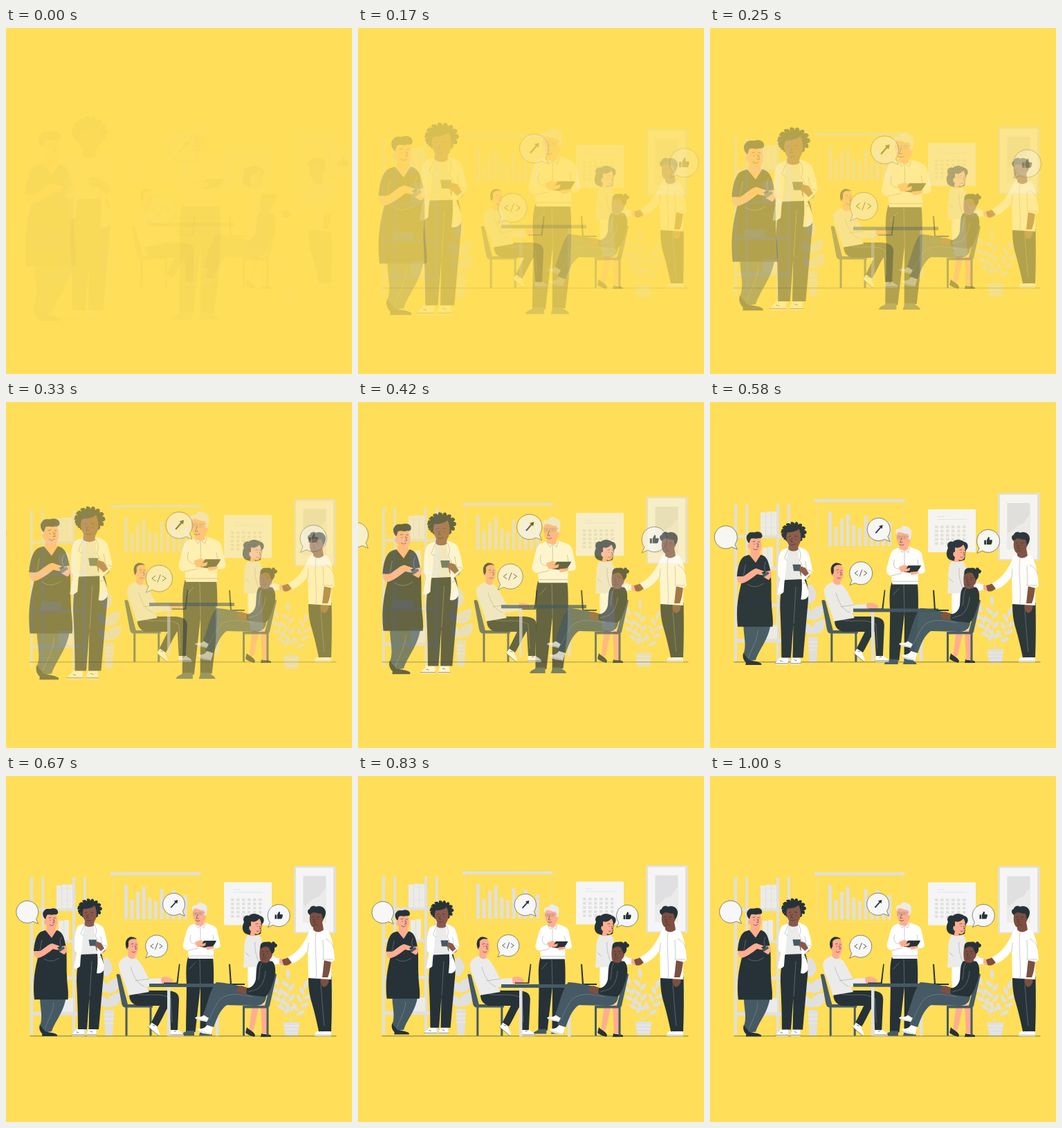
An HTML page that plays this animation: 500 by 500 pixels, repeating every 1.04 s.

```html
<!DOCTYPE html>
<html lang="en">
<head>
<meta charset="utf-8">
<title>Team at work</title>
<style>
html, body { margin: 0; width: 100%; height: 100%; overflow: hidden; background: #ffde59; }
svg { display: block; width: 100vw; height: 100vh; }
.k { fill: #263238; }
.g { fill: #455a64; }
.w { fill: #fff; }
.p { fill: #f5f5f5; }
.l { fill: #e0e0e0; }
.e { fill: #ebebeb; }
.s { fill: #ffad90; }
.b { fill: #8a594b; }
.d { fill: #7d4f40; }
.t, .u, .v { fill: none; stroke: #263238; stroke-width: .6; stroke-linecap: round; stroke-linejoin: round; }
.u { stroke: #8d969a; stroke-width: .5; }
.v { stroke: #e0e0e0; stroke-width: .8; }
.bubble { fill: #f7f7f7; stroke: #263238; stroke-width: .55; }
</style>
</head>
<body>
<svg viewBox="0 0 500 500">
<defs>
  <path id="leaf" d="M0 0C-8-4-7-13 0-19C7-13 8-4 0 0"/>
  <path id="thin" d="M0 0C-4-4-3.500-10 0-15C3.500-10 4-4 0 0"/>
</defs>

<g id="back" class="fade">
  <g id="shelf" class="l">
    <path d="M35 146h4v228h-4zM51.500 146h3.500v228h-3.500zM96 146h4v228h-4zM112 146h3.500v228h-3.500zM35 191h80v4h-80zM35 237h80v4h-80zM35 290h80v4h-80zM35 341h80v5h-80z"/>
    <path class="e" d="M73 158h7v33h-7zM81 157h7v34h-7zM89 157h7v34h-7zM76 209h7v28h-7zM84 208h7v29h-7zM50 279h30v11h-30zM76 321h21v20h-21z"/>
    <path class="v" d="M80.500 158v33M88.500 157v34M75 163h3M83 162h3M91 162h3M75 180h3M83 180h3M91 180h3M83.500 209v28M50 283h30M50 287h30"/>
  </g>
  <g id="chart">
    <path class="v" style="stroke-width:.5" d="M154.500 143V210M278.500 143V210"/>
    <path class="v" style="stroke-width:.5" stroke-dasharray="2 2" d="M154 211H278"/>
    <rect class="l" x="151" y="139" width="130.500" height="4" rx=".5"/>
  </g>
  <g id="calendar">
    <path class="p" d="M315 153.500h69v62h-69z"/>
    <path class="v" d="M329 168H371M329 164h10"/>
  </g>
  <path class="l" d="M416.500 130h60v97.500h-60z"/>
  <path class="p" d="M419 132.500h54v93h-54z"/>
  <path class="l" d="M429.500 144.500h33v67h-33z"/>
  <path class="e" d="M429.500 188C440 186 439 178 448 176C457 174 455 165 462.500 162V211.500H429.500z"/>
  <g id="plants" class="l"></g>
  <path class="l" d="M141.500 338h14.500l-2 37h-10.500zM400.500 356h24l-3 19.500h-18z"/>
  <path class="t" style="stroke:#f5f5f5" d="M142 345h13M142 351h13M143 357h11M402 361h21M402 366h20M403 371h18"/>
</g>

<path class="t fade" d="M35 375.800H477"/>

<g id="rear" class="fade">
  <path class="s" d="M356 330L366 330L358 366L351 370zM368 330H379L378 372H370z"/>
  <path class="k" d="M348 363C351 367 357 368 360 374L359 377C355 376 349 374 346 371zM369 372C373 374 379 372 383 375V377H368z"/>
  <path class="w" d="M350 273H369L372 330H354C350 312 348 292 350 273z"/>
  <path class="k" d="M345 227C340 222 342 215 344 211C341 205 346 200 351 202C355 197 364 199 367 202C374 203 374 211 370 214L368 228C359 232 350 230 345 227z"/>
  <path class="s" d="M354 210C359 212 364 209 366 206C370 211 370 220 367 226C364 230 360 229 359 227L361 233H352L354 224C350 222 351 215 354 217z"/>
  <path class="t" d="M361 214l3-.7M367 214l2 .4M363 217v.6M367.500 217v.6M366 217l2 4h-2M362 224q3 1.500 4-.500"/>
  <path class="e" d="M350 230C355 232 361 231 365 230C370 234 371 242 370 250L392 263L391 273L366 270V276L343 277C345 263 343 246 346 236C347 233 348 231 350 230z"/>
  <path class="u" d="M360 240C359 251 362 262 366 270M346 255l5 5"/>
  <path class="w" d="M385 263L396 263.500V272L385 272z"/>
  <path class="s" d="M395 264L402 265L408 270L405 274L395 271.500z"/>
</g>

<g id="b3" class="fade">
  <path class="bubble" d="M-15 5A16 16 0 1 1-8 13.800L-15.500 17L-12.500 10A16 16 0 0 1-15 5z"/>
  <path class="k" d="M-5.500-1h2.700v6h-2.700zM-2-1L.3-5.500C2.300-6 2.300-3.500 1.600-1.500H5C6.500-1 6 .3 5.400 .7C6 1.500 5.600 2.500 5 2.800C5.200 4 4.500 5 3.300 5H-2z"/>
</g>

<g id="guest" class="fade">
  <path class="w" d="M449 369C456 369 461 368 464 367L470 370V375.500H446C446 372 447 371 449 369z"/>
  <path class="u" d="M446 374H470M452 369l3 2M456 368l2 2"/>
  <path class="k" d="M437 290H470.500C471 318 471 344 470 369H452C449 355 446 342 442 328C438 315 437 304 437 290z"/>
  <path class="u" d="M455 302C457 325 458 345 460 361"/>
  <path class="d" d="M409 261L413 269C410 273 405 275 401 273L399 266C402 263 405 265 409 261zM456 285L466 288C468 295 466 303 460 305C454 303 453 298 456 285z"/>
  <path class="w" d="M444 219C452 222 459 219 463 222C470 226 474 247 475 266L470 269L470 294L437 292L436 252C432 259 422 268 414 271L407 262C421 256 431 242 438 225C440 221 442 220 444 219z"/>
  <path class="d" d="M460 264L470 267C469 276 468 284 465 291L457 291z"/>
  <path class="w" d="M457 242L475 264L471 269L458 266z"/>
  <path class="u" d="M448 225C445 246 450 270 448 293M458 237C458 249 460 255 458 265H472M462 235C466 238 470 239 474 249M437 241L436 254"/>
  <path class="d" d="M440 196C445 194 453 194 458 195C461 199 460 207 457 211L459 222C454 227 447 226 444 222V219C438 215 438 206 440 196z"/>
  <path class="k" d="M439 201C435 198 435 193 439 192C440 187 446 187 448 189C455 186 462 191 462 197C462 201 460 206 458 207L456 199C450 199 444 195 441 199z"/>
  <path class="t" d="M442 204l3-.7M449 204l4-.5M443.500 207v.7M450.500 207v.7M446 206l-1.500 6h3M444 215q4 1.500 6-.500"/>
</g>

<g id="left1" class="fade">
  <path class="g" d="M49 318H87C84 341 72 352 66 369L54 371L49 361C54 348 49 337 49 318z"/>
  <path class="u" d="M69 328C68 343 60 354 56 366"/>
  <path class="k" d="M49 359C51 364 56 366 57 371L54 374C49 370 47 365 49 359zM54 368C60 371 69 370 74 374V376H52C52 373 53 370 54 368z"/>
  <path class="s" d="M60 212H71L72 225L66 236L58 225z"/>
  <path class="k" d="M57 223L66 234L73 223C80 224 83 230 85 239C89 254 87 273 88 289C88 300 91 312 89.500 323H41C39 304 40 287 45 267L48 254L40 253C41 242 43 231 49 226C52 224 54 224 57 223z"/>
  <path class="u" d="M52 237C50 243 51 248 48 254M55 264C64 270 70 267 77 263M80 233C77 239 78 242 80 247"/>
  <path class="s" d="M40.500 253L49 253C56 249 61 243 67 242L78 246L74 248L80 252L72 251L68 250C62 255 51 263 45 263C41 261 40 257 40.500 253zM81 246L87 245C89 249 88 255 84 258L77 254z"/>
  <path class="g" d="M75 250L83 246.500L85 249L78 254z"/>
  <path class="s" d="M56 198C61 196 69 197 72 199C75 206 75 214 72 219C68 224 61 222 59 216C54 214 54 209 57 208z"/>
  <path class="k" d="M57 207C53 204 52 197 55 195C57 191 61 192 64 192C69 190 75 192 75 196C76 199 73 201 70 200C66 202 62 199 59 201z"/>
  <path class="t" d="M62 205l3-.7M69 205l2.500.2M64 208v.7M70 208v.7M68 207l2 5h-2.500M63 215q4 3 6-.5"/>
</g>

<g id="left2" class="fade">
  <path class="w" d="M102 365H113V375.500H95C95 371 101 370 102 365zM119 365H130L131 375.500H117C116 371 119 369 119 365z"/>
  <path class="t" d="M95 374H113M117 374H131M102 370l3 1M122 369l3 1"/>
  <path class="k" d="M108 255H137C142 267 142 282 140 298C138 321 136 343 134 366H119.500L120.500 320L117 366H104C104 339 103 318 102 297C102 280 104 266 108 255z"/>
  <path class="u" d="M121 318L124 268"/>
  <path class="e" d="M109 215L131 214L133 257L107 258z"/>
  <path class="b" d="M115 207H127L128 215C125 219 116 219 113 215zM99 246L104 242L107 246L108 252L102 256zM127 241L134 238L141 246C146 250 143 255 138 256C133 256 129 251 130 248z"/>
  <path class="w" d="M114 214C110 230 111 247 108 261L107 275C104 278 101 279 98 278L102 256L99 251C99 237 99 224 104 217C107 215 110 214 114 214zM127 212C134 214 139 216 141 220C144 228 146 238 147 246L140 255L136 258C140 267 143 275 141 281C138 285 135 286 131 285C134 265 132 249 129 237z"/>
  <path class="u" d="M127 214C132 220 131 226 129 231L133 238L131 251M137 232L139 244L146 246M114 214L108 228L112 231M134 263l6-2M140 254l-4 4"/>
  <path class="g" d="M119.500 236.500H131L130 245.500H121z"/>
  <path class="b" d="M130 239L137 241L142 249L137 253L129 245z"/>
  <ellipse class="k" cx="121" cy="192" rx="15" ry="12"/>
  <g fill="none" stroke="#263238" stroke-linecap="round">
    <ellipse cx="121" cy="192" rx="15" ry="12" stroke-width="5" stroke-dasharray="0 5.600"/>
    <ellipse cx="121" cy="192" rx="16.500" ry="13.500" stroke-width="2.800" stroke-dasharray="0 6.750"/>
  </g>
  <path class="b" d="M112 192C118 192 126 190 128 187C132 194 132 206 127 211C122 216 115 214 113 207C110 202 110 197 112 192z"/>
  <path class="t" d="M114 198l3-1M122 197l4 .5M116 201v.8M124 201v.8M119 200l-2 5h3M117 209q3 1 6-.5"/>
</g>

<g id="middle" class="fade">
  <path class="k" d="M263 262H299C301 281 300 306 299 326L294 369H280.500L281 304L273.500 370H260C260 345 261 322 261 301C260 284 260 272 263 262z"/>
  <path class="g" d="M261 368H272V375H253C253 371 259 371 261 368zM281 368H291C293 371 297 371 298 375H279z"/>
  <path class="u" d="M280 265L281 304M265 279L273 270"/>
  <path class="w" d="M273 213C278 217 284 216 288 212C296 215 303 216 305 222L310 245C309 249 304 250 300 249L300 264H264L263 252C258 252 255 248 256 243C259 234 260 220 266 216z"/>
  <path class="u" d="M281 217V237M273 213L278 220L281 216L286 220L288 213M267 230C265 236 265 243 275 243M263 252L277 249M299 230L301 241M264 260H300"/>
  <path class="s" d="M273 240L281 237L288 240L284 247L276 247zM291 247L301 245L300 249L292 251z"/>
  <path class="k" d="M286 238L304 238C302 243 299 246 296 249L281 247z"/>
  <path class="s" d="M282 243L289 241L288 245L282 247zM289 247L300 246L297 250L290 251z"/>
  <path class="s" d="M271 191C276 188 284 188 288 192C291 199 289 209 285 212L286 215C282 218 277 217 274 214L275 211C270 207 269 199 271 191z"/>
  <path class="e" d="M270 195C267 191 269 186 275 187C277 183 282 182 286 185C291 186 292 193 289 202L287 202L286 194C281 195 275 190 272 192z"/>
  <path class="u" d="M271 197h4.500v4h-4zM278 197h5v4h-5zM275.500 198h2.500M283 198l5-1"/>
  <path class="t" d="M273.500 198.500v.7M280.500 198.500v.7M277 200l-2 6h3M274 209q3 2 6 0"/>
</g>

<g id="sitter" class="fade">
  <path class="g" d="M159.500 287C162 285 164 286 165 288L176 330H212V334.500H172C169 334 168 332 167 328zM172.500 333H175.500V375.500H172.500zM207.500 333H210.500V375.500H207.500z"/>
  <path class="w" d="M211 356L218 361C218 367 222 369 222 373L220 375L206 363zM238 366H248C251 370 257 370 257 375.500H237z"/>
  <path class="t" d="M206 363L220 375M237 374H257M212 360l3 1M243 369l3-1"/>
  <path class="k" d="M179 310H233C245 311 250 314 250 323L248 367H238L236 331C230 340 226 351 219 362L210 356C215 346 219 338 222 332H190C181 329 176 322 179 310z"/>
  <path class="u" d="M190 315C205 319 222 312 238 321L240 356"/>
  <path class="e" d="M176 260C182 262 187 262 190 265C197 272 202 286 207 293L226 292L226 301L203 305L207 312L177 317C174 301 162 282 163 272C164 265 170 262 176 260z"/>
  <path class="u" d="M180 276C184 289 190 301 200 304M187 296L207 293"/>
  <path class="s" d="M224 292C230 288 237 291 242 295L239 299L225 300z"/>
  <path class="s" d="M176 238C181 233 189 235 190 240C193 248 190 257 186 260L187 263C182 266 178 264 176 260L177 253C172 250 172 245 175 245z"/>
  <path class="k" d="M175 250C171 244 173 236 177 234C180 231 187 233 189 236C183 234 179 236 177 239L177 246z"/>
  <path class="t" d="M181 243l3-.7M187 243l2 .4M183 246v.7M188 246v.7M186 245l2.500 5h-2M182 254q3 2 5 0"/>
  <path class="k" d="M250 271.500L251.500 272L248.500 300H228V298.500H246.500z"/>
</g>

<g id="table" class="fade">
  <path class="l" d="M233 304H237.500V375.500H233zM303 304H307.500V375.500H303z"/>
  <path class="g" d="M207 300H330V305H207z"/>
</g>

<g id="lady" class="fade">
  <path class="k" d="M322 272H324L326 300H345V302H324z"/>
  <path class="g" d="M389 285L391 287L381 332C380 335 378 335.500 376 335.500H342V332H374L385 288C386 286 387 285 389 285zM342 334H345V375.500H342zM376.500 334H379.500V375.500H376.500z"/>
  <path class="w" d="M288 343L298 348L294 358C288 353 279 355 273 350L275 348C280 349 284 348 288 343zM291 359L300 361L296 374C290 372 282 373 277 368L278 365C284 366 288 364 291 359z"/>
  <path class="u" d="M274 350C282 354 288 352 294 357M277 368L295 373"/>
  <path class="g" d="M304 298C315 298 331 302 345 305L376 314C377 325 372 332 360 332L319 331C309 338 305 350 300 363L288 359L293 350L285 345C291 330 295 308 304 298z"/>
  <path class="u" d="M294 350C299 340 303 330 310 322C323 312 340 316 356 319"/>
  <path class="k" d="M367 267C374 270 380 266 385 268C391 274 390 287 386 298C383 306 381 314 375 319C367 318 358 318 348 315L347 307C355 306 359 302 361 294C362 283 361 271 367 267z"/>
  <path class="u" d="M375 282C374 293 371 302 363 308L350 312M370 270C365 277 367 286 365 294"/>
  <path class="d" d="M348 306L340 303L333 307L335 313L347 315z"/>
  <path class="d" d="M368 245C374 241 382 245 385 251C386 258 384 263 381 265V268C375 272 369 270 367 265C366 258 366 251 368 245z"/>
  <path class="k" d="M368 250C366 243 370 239 377 240C380 239 383 240 384 242C384 238 389 239 389 242C394 243 392 248 388 248C389 253 386 257 384 257L380 248C375 245 371 247 368 250z"/>
  <path class="t" d="M369 254l3-.5M376 253.500l3 .4M371 256.500v.7M377.500 256.500v.7M373 256l-1.500 5h3M370 264q3 1 6-.5"/>
</g>

<g id="b0" class="fade"><path class="bubble" d="M15 5A16 16 0 1 0 8 13.800L15.500 17L12.500 10A16 16 0 0 0 15 5z"/></g>
<g id="b1" class="fade">
  <path class="bubble" d="M15 5A16 16 0 1 0 8 13.800L15.500 17L12.500 10A16 16 0 0 0 15 5z"/>
  <path class="t" style="stroke-width:1.800;stroke-linecap:butt" d="M-4.500 5L3-3.500"/><path class="k" d="M5.500-6.200L4.500-.8L0-4.800z"/>
</g>
<g id="b2" class="fade">
  <path class="bubble" d="M-15 5A16 16 0 1 1-8 13.800L-15.500 17L-12.500 10A16 16 0 0 1-15 5z"/>
  <path class="t" style="stroke-width:.8" d="M-4.500-3L-8.500 0L-4.500 3M4.500-3L8.500 0L4.500 3M1.700-4.500L-1.700 4.500"/>
</g>
</svg>

<script>
const $ = id => document.getElementById(id);
const NS = 'http://www.w3.org/2000/svg';
function add(parent, tag, attrs) {
  const el = document.createElementNS(NS, tag);
  for (const name in attrs) el.setAttribute(name, attrs[name]);
  parent.append(el);
  return el;
}

// Chart columns
[157, 179, 167, 160, 176, 181, 163, 181, 165, 181, 172].forEach((y, i) =>
  add($('chart'), 'rect', { class: 'l', x: 171 + 8.6 * i, y, width: 4.8, height: 207 - y }));

// Calendar days
for (let i = 0; i < 30; i++)
  add($('calendar'), 'rect', { class: 'l', x: 325 + i % 6 * 8, y: 177 + Math.floor(i / 6) * 6, width: 4.5, height: 3.8 });

// Plants
function leaf(kind, x, y, angle, size) {
  add($('plants'), 'use', { href: '#' + kind, transform: `translate(${x} ${y}) rotate(${angle}) scale(${size})` });
}
function stem(d) { add($('plants'), 'path', { d, class: 'v' }); }
stem('M148 338C150 315 148 295 145 280M149 330L157 320');
[[145, 290, 0, 1.5], [147, 313, 38, 1.4], [148, 333, 42, 1.4], [147, 312, -42, 1.2], [148, 334, -38, 1.1]]
  .forEach(a => leaf('leaf', ...a));
[[-19, 300], [-4, 290], [19, 305]].forEach(([dx, top]) => {
  const x = 412 + dx;
  stem(`M412 356Q${x} 335 ${x} ${top}`);
  leaf('thin', x, top + 3, dx, 1);
  for (let i = 1; i < 4; i++) {
    const f = i / 4, y = top + (356 - top) * f * .9;
    const px = x + (412 - x) * f * f;
    leaf('thin', px, y, -42 + dx, .95);
    leaf('thin', px, y + 6, 42 + dx, .95);
  }
});

const LOOP = 1040;
const knots = [[0, 98], [3, 82], [7, 55], [11, 24], [15, 5], [19, 0], [23, 6]];
const slope = i => {
  const a = knots[Math.max(i - 1, 0)], b = knots[Math.min(i + 1, knots.length - 1)];
  return (b[1] - a[1]) / (b[0] - a[0]);
};

// Distance still to travel, as a smooth curve through the knots
function distance(step) {
  let i = 0;
  while (i < knots.length - 2 && step > knots[i + 1][0]) i++;
  const [x0, y0] = knots[i], [x1, y1] = knots[i + 1];
  const w = x1 - x0, u = (step - x0) / w, v = 1 - u;
  return v * v * (1 + 2 * u) * y0 + u * u * (3 - 2 * u) * y1
    + w * u * v * (v * slope(i) - u * slope(i + 1));
}

const move = (id, x, y) => $(id).setAttribute('transform', `translate(${x} ${y})`);
const grow = (id, x, y, s) => $(id).setAttribute('transform', `translate(${x} ${y}) scale(${s}) translate(${-x} ${-y})`);
const bubble = (id, x, y, s) => $(id).setAttribute('transform', `translate(${x} ${y}) scale(${s})`);
const layers = document.querySelectorAll('.fade');

function draw(t) {
  const tick = Math.floor((t + 4.9) * .024);
  const e = distance(Math.max(tick - 1, 0));
  const r = e - 5;
  const x = Math.min((Math.max(tick, 1) * 41.667 + 18) / 680, 1);
  const alpha = x * x * (3 - 2 * x);
  layers.forEach(el => { el.style.opacity = alpha; });

  move('back', 0, .2 * r);
  move('sitter', .235 * r, 0);
  move('table', 0, -.2 * r);
  const s = 1 + .0052 * r;
  grow('left1', 66, 279, s);
  grow('left2', 121, 279, s);
  grow('middle', 280, 279, s);

  const z = .98 + .004 * e;
  bubble('b0', 36 - e, 197 - .13 * e, z);
  bubble('b1', 242 + .155 * e, 186 - .145 * e, z);
  bubble('b2', 217 + .073 * e, 245 + .18 * e, z);
  bubble('b3', 389 + e, 202 - .09 * e, z);
}

const start = performance.now();
function frame() {
  draw((performance.now() - start) % LOOP);
  requestAnimationFrame(frame);
}
frame();
</script>
</body>
</html>
```
